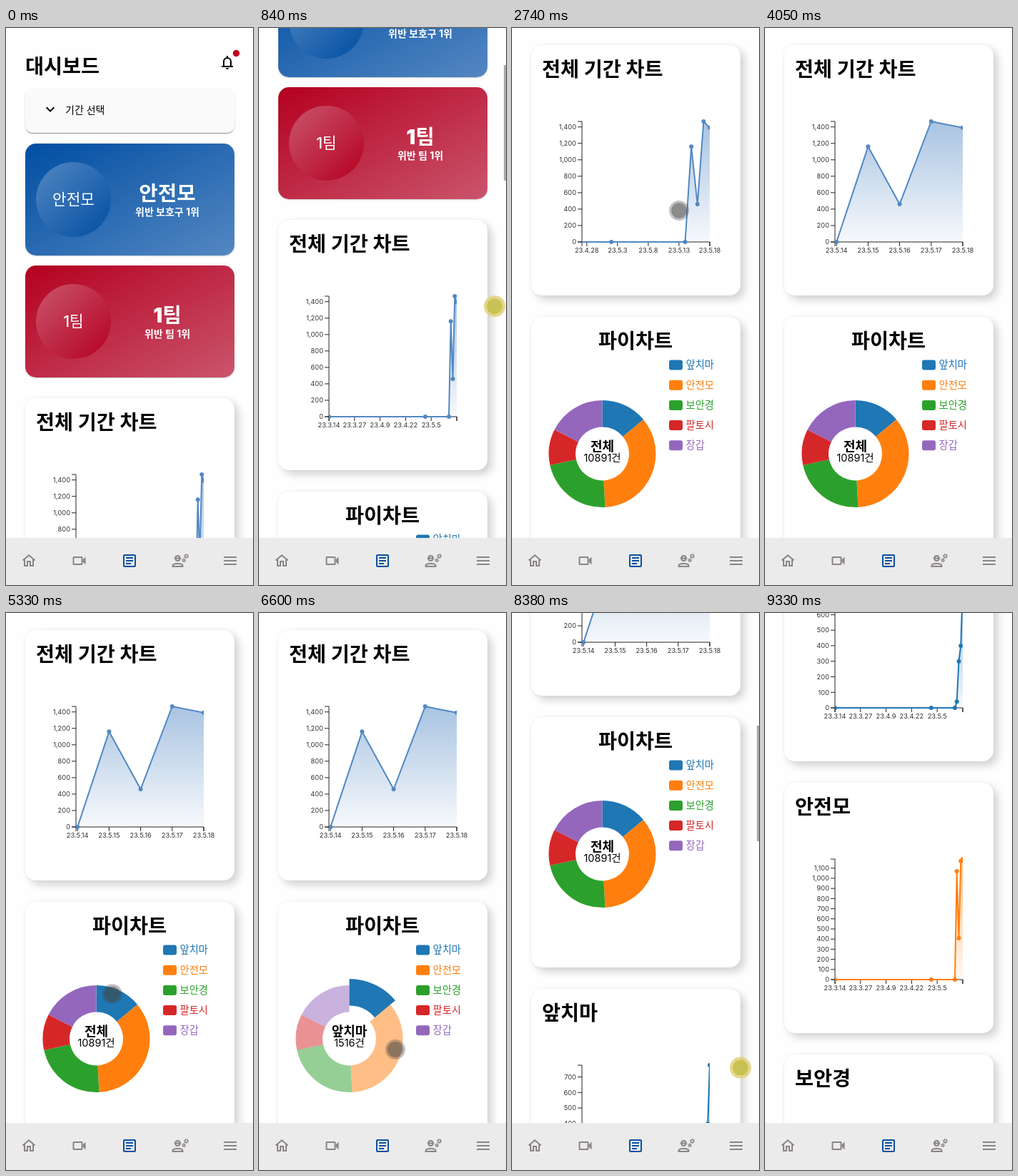
Recreate the animation shown at these times as an HTML page. Size 346 px wide and 781 px high, loop 9830 ms.

```html
<!DOCTYPE html>
<html lang="ko">
<head>
<meta charset="utf-8">
<style>
  html, body { margin: 0; width: 100%; height: 100%; overflow: hidden; background: #fefefe; }
  body { position: relative; font-family: Inter, "Noto Sans CJK KR", "Noto Sans CJK", sans-serif; }
  #page, #page > *, #thumb, #nav, #pointer { position: absolute; }
  #page { left: 0; top: 0; width: 346px; height: 2420px; will-change: transform; }
  #page > div { left: 27px; width: 292.5px; box-sizing: border-box; border-radius: 15px; }
  .panel { height: 351px; background: #fff; box-shadow: 6px 6px 12px #d2d2d2, 0 0 4px #f0f0f0; }
  #page > .select { top: 86px; height: 61px; background: #fafafa; border-radius: 10px;
    box-shadow: 0 2px 1px -1px #0003, 0 1px 1px #0003, 0 1px 3px #0002; }
  .rank { height: 156.5px; box-shadow: 0 1px 2px #0003; background: linear-gradient(to bottom right, var(--dark), var(--light)); }
  .rank::before { content: ""; position: absolute; left: 15px; top: 26px; width: 105px; height: 105px;
    border-radius: 50%; background: linear-gradient(to bottom right, var(--light), var(--dark)); }
  svg { display: block; overflow: visible; }
  .title { font-size: 28.3px; font-weight: 700; }
  .axis text { font-size: 9.3px; fill: #333; }
  .axis path { fill: none; stroke: #222; }
  .icon { fill: none; stroke: currentColor; stroke-width: 2; }
  .icon .solid { fill: currentColor; stroke: none; }
  #thumb { right: 0; width: 3px; height: 162px; background: #aaa; }
  #nav { left: 0; top: 715px; width: 346px; height: 66px; background: #ebebeb; color: #8b8486; }
  #pointer { left: -11px; top: -11px; width: 22px; height: 22px; border-radius: 50%; }
</style>
</head>
<body>
<div id="page">
  <div class="select"></div>
  <div class="rank" style="top:162px;--dark:#004ea2;--light:#5487c2"></div>
  <div class="rank" style="top:333px;--dark:#b40020;--light:#ca556c"></div>
  <svg id="content" width="346" height="2420"></svg>
</div>
<div id="thumb"></div>
<div id="nav"><svg id="icons" width="346" height="66"></svg></div>
<div id="pointer"></div>

<script>
const LOOP = 9830, LAST_DAY = 65, MIN_DAYS = 4.05;
const LEFT = 98, RIGHT = 277, TOP = 107, BASE = 276;
const $ = id => document.getElementById(id);
const ramp = (t, start, end) => Math.min(1, Math.max(0, (t - start) / (end - start)));
const smooth = p => p * p * (3 - 2 * p);
const between = (t, start, end) => t >= start && t < end;

const slices = [
  { name: '앞치마', count: 1516, color: '#1f77b4' },
  { name: '안전모', count: 3838, color: '#ff7f0e' },
  { name: '보안경', count: 2441, color: '#2ca02c' },
  { name: '팔토시', count: 1180, color: '#d62728' },
  { name: '장갑', count: 1916, color: '#9467bd' }
];
const total = slices.reduce((sum, s) => sum + s.count, 0);

const panels = ['전체 기간 차트', '파이차트', '앞치마', '안전모', '보안경'];
const panelTop = i => 519 + 381 * i;

// Values are for the last four days; all earlier days are zero.
const charts = [
  { panel: 0, color: '#5288c4', step: 200, values: [1160, 460, 1467, 1390] },
  { panel: 2, color: '#1f77b4', step: 100, values: [40, 300, 400, 776] },
  { panel: 3, color: '#ff7f0e', step: 100, values: [1070, 408, 1170, 1190] }
];

// Each gesture takes the pointer to x, y; those with a scroll distance press and drag.
const gestures = [
  { start: 150, end: 290, x: 330, y: 640 },
  { start: 300, end: 850, x: 330, y: 390, scroll: 250 },
  { start: 850, end: 1050, x: 330, y: 627 },
  { start: 1050, end: 1598, x: 330, y: 382, scroll: 245 },
  { start: 1660, end: 2060, x: 234, y: 256 },
  { start: 3350, end: 4510, x: 233, y: 150 },
  { start: 4510, end: 4720, x: 291, y: 185 },
  { start: 5130, end: 5380, x: 133, y: 573 },
  { start: 5590, end: 5700, x: 150, y: 550 },
  { start: 6280, end: 6500, x: 191, y: 612 },
  { start: 6850, end: 7200, x: 282, y: 621 },
  { start: 7600, end: 8280, x: 282, y: 368, scroll: 253 },
  { start: 8280, end: 8350, x: 320, y: 640 },
  { start: 8350, end: 8900, x: 320, y: 380, scroll: 676 },
  { start: 8950, end: 9300, x: 341, y: 781 }
];

function gestureState(t) {
  const state = { x: 341, y: 781, scroll: 0, pressed: false, thumb: 0 };
  for (const { start, end, x, y, scroll = 0 } of gestures) {
    const p = smooth(ramp(t, start, end));
    state.x += (x - state.x) * p;
    state.y += (y - state.y) * p;
    state.scroll += scroll * p;
    if (scroll && t >= start) {
      state.pressed ||= t < end;
      state.thumb = 1 - ramp(t, end + 200, end + 400);
    }
  }
  return state;
}

const text = (x, y, value, size, weight = 400, fill = '#000', anchor = 'middle') =>
  `<text x="${x}" y="${y}" font-size="${size}" font-weight="${weight}" fill="${fill}" text-anchor="${anchor}">${value}</text>`;
const title = (x, y, value, anchor = 'start') => `<text class="title" x="${x}" y="${y}" text-anchor="${anchor}">${value}</text>`;
const icon = (x, y, shape, color = 'inherit') => `<g class="icon" transform="translate(${x} ${y})" style="color:${color}">${shape}</g>`;
const path = (d, attributes = '') => `<path d="${d}" ${attributes}/>`;

function dateLabel(day) {
  const date = new Date(2023, 2, 14 + day);
  return `23.${date.getMonth() + 1}.${date.getDate()}`;
}

function drawChart({ panel, color, step, values }, days) {
  const max = Math.max(...values);
  const px = day => RIGHT - (LAST_DAY - day) * (RIGHT - LEFT) / days;
  const py = value => BASE - value / max * (BASE - TOP);
  const points = [[0, 0], [49, 0], [61, 0], ...values.map((v, i) => [62 + i, v])].map(([d, v]) => [px(d), py(v)]);
  const line = 'M' + points.map(p => p.join()).join('L');

  let ticks = `M92,${TOP}H${LEFT}V${BASE}H92M${LEFT},${BASE + 6}V${BASE}H${RIGHT}v6`, labels = '';
  for (let v = 0; v <= max; v += step) {
    ticks += `M92,${py(v)}H${LEFT}`;
    labels += `<text x="90" y="${py(v) + 3.3}" text-anchor="end">${v.toLocaleString('en-US')}</text>`;
  }
  const interval = Math.ceil(days / 5);
  for (let day = LAST_DAY; px(day) >= LEFT - .01; day -= interval) {
    ticks += `M${px(day)},${BASE}v6`;
    if (days < LAST_DAY || day < LAST_DAY)
      labels += `<text x="${px(day)}" y="${BASE + 15}" text-anchor="middle">${dateLabel(day)}</text>`;
  }
  return `<g class="axis">${path(ticks)}${labels}</g>
    <g clip-path="url(#plot)">
      ${path(`${line}V${BASE}H${points[0][0]}Z`, `fill="url(#fade${panel})"`)}
      ${path(line, `fill="none" stroke="${color}" stroke-width="2"`)}
      ${points.map(([x, y]) => `<circle cx="${x}" cy="${y}" r="3" fill="${color}"/>`).join('')}
    </g>`;
}

function drawPie(pops) {
  const focus = Math.max(...pops), selected = focus > 0 ? slices[pops.indexOf(focus)] : { name: '전체', count: total };
  const at = (r, a) => `${r * Math.sin(a)},${-r * Math.cos(a)}`;
  let angle = 0;
  const arcs = slices.map(({ count, color }, i) => {
    const start = angle, end = angle += count / total * 2 * Math.PI, pop = pops[i] || 0;
    const outer = 75 + 9 * pop, inner = 37.5 + 9 * pop;
    return path(`M${at(outer, start)}A${outer},${outer} 0 0 1 ${at(outer, end)}L${at(inner, end)}A${inner},${inner} 0 0 0 ${at(inner, start)}Z`,
      `fill="${color}" opacity="${1 - focus * (1 - pop) / 2}"`);
  });
  return `<g transform="translate(126.5 192)">${arcs.join('')}
    ${text(0, -4, selected.name, 18, 700)}${text(0, 11, selected.count + '건', 14.5)}</g>`;
}

const rankText = (y, name, label) => text(94.5, y + 86, name, 21.3, 500, '#fff') +
  text(226, y + 80, name, 28.8, 900, '#fff') + text(226, y + 101, label, 14, 700, '#fff');

function navIcons() {
  const gear = (x, y, r) => `<circle cx="${x}" cy="${y}" r="${r}" stroke-width="1.3"/>
    <circle cx="${x}" cy="${y}" r="${r + 1}" stroke-width="1.2" pathLength="12" stroke-dasharray="1"/>`;
  const shapes = [
    path('M3.5 11.5 12 4.3l8.5 7.2M6 10v9h4v-6h4v6h4v-9'),
    '<rect x="4" y="7" width="12" height="10" rx=".5"/>' + path('M17 10.5l4-4v11l-4-4z', 'class="solid"'),
    '<rect x="4" y="4" width="16" height="16" rx="1"/>' + path('M7 8h10M7 12h10M7 16h7'),
    path('M2 20v-1c0-4 14-4 14 0v1zM6 9a3 3 0 0 0 6 0M4.3 8.5h9.4M6 8a3 3 0 0 1 6 0') + gear(21, 5.5, 1.9) + gear(17.6, 11.3, 1.4),
    path('M3 7h18M3 12h18M3 17h18')
  ];
  return shapes.map((shape, i) => icon(20 + 70.5 * i, 20, shape, i === 2 ? '#0b50a0' : 'inherit')).join('');
}

function build() {
  panels.forEach((_, i) =>
    $('content').insertAdjacentHTML('beforebegin', `<div class="panel" style="top:${panelTop(i)}px"></div>`));

  const fades = charts.map(({ panel, color }) => `<linearGradient id="fade${panel}" gradientUnits="userSpaceOnUse" x1="0" x2="0" y1="${TOP}" y2="${BASE}">
    <stop stop-color="${color}" stop-opacity=".5"/><stop offset="1" stop-color="${color}" stop-opacity=".05"/></linearGradient>`).join('');
  const legend = slices.map(({ name, color }, i) => `<rect x="220" y="${60.5 + i * 28.2}" width="19" height="14" rx="3" fill="${color}"/>` +
    text(243.5, 72.3 + i * 28.2, name, 14.3, 400, color, 'start')).join('');
  const bell = path('M7 18v-7a5 5 0 0 1 10 0v7M4 18h16M12 3v3') + path('M10 20h4a2 2 0 0 1-4 0', 'class="solid"');

  $('content').innerHTML = `<defs>${fades}<clipPath id="plot"><rect x="${LEFT}" y="${TOP - 4}" width="${RIGHT - LEFT}" height="${BASE - TOP + 8}"/></clipPath></defs>
    ${title(27, 64, '대시보드')}
    ${icon(298, 36, bell, '#000')}<circle cx="322.5" cy="35.5" r="4.7" fill="#c00020"/>
    ${icon(50, 102, path('M6.7 9.3l5.3 5.3 5.3-5.3'), '#000')}
    ${text(83, 119.5, '기간 선택', 14, 400, '#000', 'start')}
    ${rankText(162, '안전모', '위반 보호구 1위')}
    ${rankText(333, '1팀', '위반 팀 1위')}
    ${panels.map((name, i) => `<g transform="translate(0 ${panelTop(i)})">
      ${i === 1 ? title(173, 44, name, 'middle') + legend : title(42, 44, name)}<g id="panel${i}"></g></g>`).join('')}`;
  for (const chart of charts) $('panel' + chart.panel).innerHTML = drawChart(chart, LAST_DAY);
  $('icons').innerHTML = navIcons();
}

function render(t) {
  const { x, y, scroll, pressed, thumb } = gestureState(t);
  $('page').style.transform = `translateY(${-Math.round(scroll)}px)`;

  const zoom = .69 * ramp(t, 2110, 3170) + .31 * ramp(t, 3580, 4000);
  $('panel0').innerHTML = drawChart(charts[0], LAST_DAY * (MIN_DAYS / LAST_DAY) ** zoom);

  const swap = ramp(t, 6800, 7050);
  $('panel1').innerHTML = drawPie([ramp(t, 5620, 5900) - swap, swap - ramp(t, 7330, 7500)]);

  $('thumb').style.top = scroll * .209 + 'px';
  $('thumb').style.opacity = thumb;

  Object.assign($('pointer').style, {
    display: between(t, 150, 3350) || between(t, 4510, 9300) ? 'block' : 'none',
    transform: `translate(${x}px, ${y}px)`,
    background: pressed ? '#c6bf4bf0' : '#4646469e',
    boxShadow: pressed ? '0 0 0 4px #e2d27ae0' : '0 0 0 3px #46464654'
  });
}

build();
const startTime = performance.now();
(function frame() {
  render((performance.now() - startTime) % LOOP);
  requestAnimationFrame(frame);
})();
</script>
</body>
</html>
```
